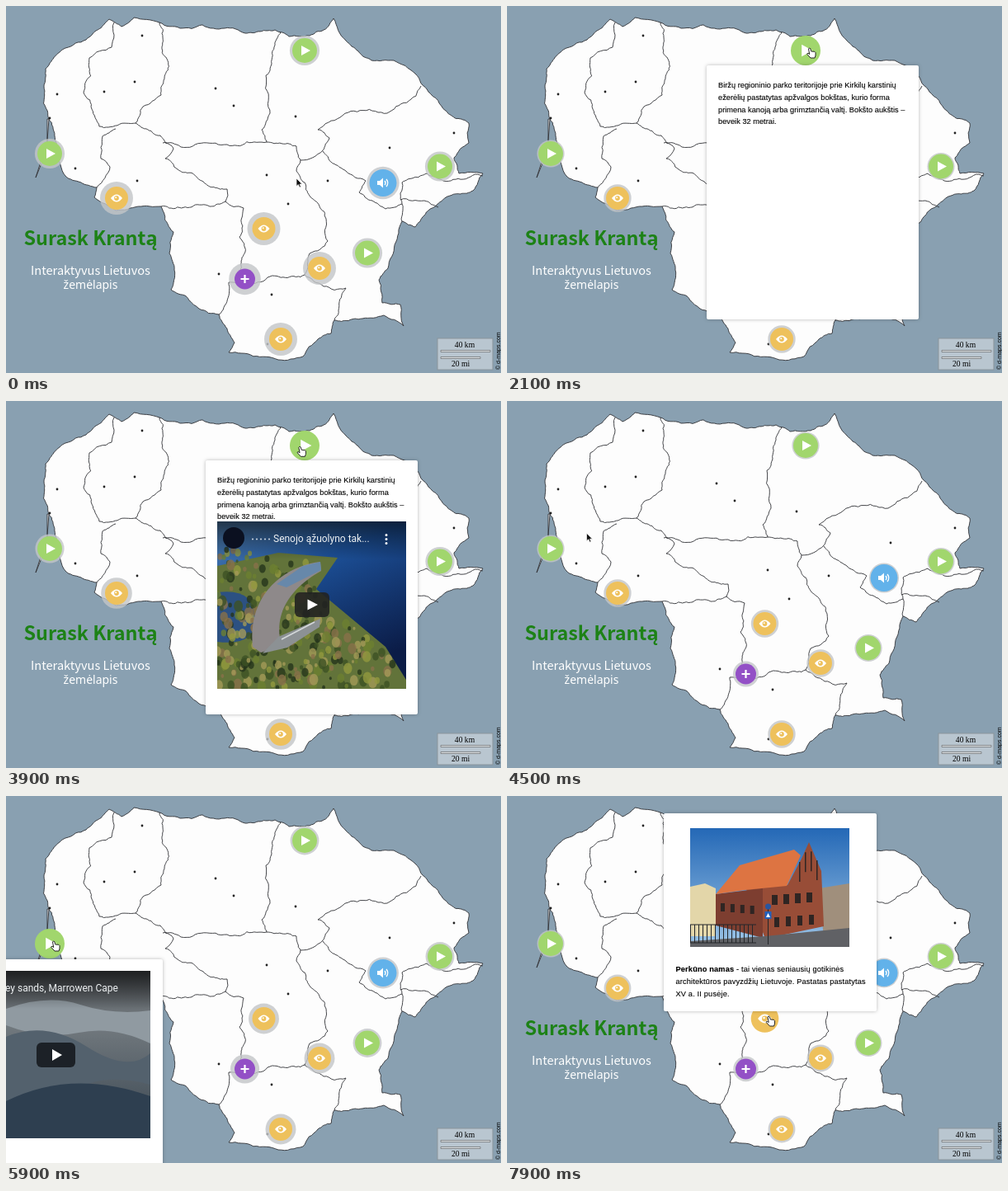
Animation of 600x445 px, one loop 8000 ms. Source, as an HTML page:

```html
<!DOCTYPE html>
<html lang="lt">
<head>
<meta charset="utf-8">
<title>Interaktyvus žemėlapis</title>
<style>
html, body { margin: 0; width: 100%; height: 100%; overflow: hidden; background: #89a0b1; }
svg { display: block; width: 600px; height: 445px; }
.line { fill: none; stroke: #303236; stroke-width: .9; stroke-linejoin: round; }
.land { fill: #fdfdfd; }
.head { font-family: "Noto Sans CJK SC", "Noto Sans CJK JP", "Noto Sans", sans-serif; text-anchor: middle; }
.body { font: 9.2px "Liberation Sans", Arial, sans-serif; fill: #000; stroke: #000; stroke-width: .12px; letter-spacing: .04px; }
.video { font: 12px Roboto, sans-serif; fill: #eef1f3; }
.scale { font: 9.6px "Liberation Serif", Times, serif; text-anchor: middle; }
.popup { filter: drop-shadow(0 0 2px rgba(0,0,0,.28)); }
</style>
</head>
<body>
<svg viewBox="0 0 600 445">
  <defs>
    <linearGradient id="lake" x1="0" y1="0" x2=".5" y2="1">
      <stop offset="0" stop-color="#5586b8"/><stop offset=".4" stop-color="#1c4f96"/><stop offset="1" stop-color="#0b1c47"/>
    </linearGradient>
    <linearGradient id="sky" x1="0" y1="0" x2="0" y2="1">
      <stop offset="0" stop-color="#2468b6"/><stop offset="1" stop-color="#9cc4e6"/>
    </linearGradient>
    <linearGradient id="dune" x1="0" y1="0" x2="0" y2="1">
      <stop offset="0" stop-color="#4b4f53"/><stop offset=".3" stop-color="#747b80"/><stop offset="1" stop-color="#37444f"/>
    </linearGradient>
    <linearGradient id="shade" x1="0" y1="0" x2="0" y2="1">
      <stop offset="0" stop-color="#000" stop-opacity=".6"/><stop offset="1" stop-color="#000" stop-opacity="0"/>
    </linearGradient>
    <clipPath id="clipLake"><rect x="256" y="146" width="229" height="203"/></clipPath>
    <clipPath id="clipHouse"><rect x="222" y="39" width="193" height="144"/></clipPath>
    <clipPath id="clipDune"><rect x="0" y="212" width="175" height="203"/></clipPath>
  </defs>
  <rect width="600" height="445" fill="#89a0b1"/>
  <g id="map"></g>

  <g id="legend">
    <rect x="523" y="403" width="67" height="38" fill="#b9c6d0" stroke="#8b959c"/>
    <text class="scale" x="556" y="414">40 km</text>
    <text class="scale" x="551" y="437">20 mi</text>
    <path d="M527 417.5h60v2h-60zM527 425.5h48v2h-48z" fill="#dfe4e7" stroke="#555" stroke-width=".6"/>
    <text transform="translate(598.5 441) rotate(-90)" font-family="Liberation Sans, Arial, sans-serif" font-size="7">© d-maps.com</text>
  </g>

  <g class="head">
    <text x="102.5" y="290" font-size="23.4" font-weight="700" fill="#1d8216">Surask Krantą</text>
    <g fill="#fff">
      <text x="102.5" y="326" font-size="14.6">Interaktyvus Lietuvos</text>
      <text x="102.5" y="343" font-size="14" font-family="Noto Sans, sans-serif">žemėlapis</text>
    </g>
  </g>
  <g id="markers"></g>

  <g id="tower" class="popup">
    <rect x="242" y="72" width="257" height="308" rx="2" fill="#fff"/>
    <g class="body">
      <text x="256" y="98.5">Biržų regioninio parko teritorijoje prie Kirkilų karstinių</text>
      <text x="256" y="113.5">ežerėlių pastatytas apžvalgos bokštas, kurio forma</text>
      <text x="256" y="128.5">primena kanoją arba grimztančią valtį. Bokšto aukštis –</text>
      <text x="256" y="143">beveik 32 metrai.</text>
    </g>
    <g id="towerVideo" clip-path="url(#clipLake)">
      <rect x="256" y="146" width="229" height="203" fill="url(#lake)"/>
      <path d="M256 200L330 184 402 190 376 228 460 298 485 338V349H256z" fill="#62733a"/>
      <path d="M256 232Q300 226 302 262T256 292z" fill="#2c5182"/>
      <g id="trees"></g>
      <path d="M381 195C342 199 292 231 299 298L309 305 334 297C322 254 350 224 382 206z" fill="#8e898a"/>
      <path d="M328 222L360 200 381 195 382 205 340 226z" fill="#6788aa"/>
      <path d="M330 286L381 264 380 274 341 299 311 306z" fill="#8c9194"/>
      <path d="M334 289L374 268" stroke="#d4d8da" stroke-width="1.5"/>
      <rect x="256" y="146" width="229" height="46" fill="url(#shade)"/>
      <circle cx="276" cy="166" r="13" fill="#0b1020"/>
      <path d="M299 167.5H321" stroke="#d5dde5" stroke-width="2" stroke-linecap="round" stroke-dasharray="0 5"/>
      <text class="video" x="324" y="171">Senojo ąžuolyno tak...</text>
      <path d="M461 162.5v11" stroke="#fff" stroke-width="3" stroke-linecap="round" stroke-dasharray="0 5"/>
      <rect x="350" y="232" width="42" height="30" rx="6" fill="#222" fill-opacity=".88"/>
      <path d="M365.5 240.5L378 247 365.5 253.5z" fill="#fff"/>
    </g>
  </g>

  <g id="dunes" class="popup">
    <rect x="-68" y="198" width="258" height="308" rx="2" fill="#fff"/>
    <g id="dunesVideo" clip-path="url(#clipDune)">
      <rect y="212" width="175" height="203" fill="url(#dune)"/>
      <path d="M0 258Q50 240 90 253T175 260V300Q130 278 88 287T0 278z" fill="#909aa1"/>
      <path d="M0 292Q48 272 98 304T175 312V350Q110 332 72 365T0 378z" fill="#53616d"/>
      <path d="M0 370Q80 330 175 364V415H0z" fill="#2e3f50"/>
      <rect y="212" width="175" height="46" fill="url(#shade)"/>
      <text class="video" x="-1" y="237">ey sands, Marrowen Cape</text>
      <rect x="37" y="299" width="47" height="30" rx="6" fill="#171b20" fill-opacity=".9"/>
      <path d="M56 307L68 314 56 321z" fill="#fff"/>
    </g>
  </g>

  <g id="house" class="popup">
    <rect x="190" y="21" width="258" height="240" rx="2" fill="#fff"/>
    <g clip-path="url(#clipHouse)">
      <rect x="222" y="39" width="193" height="144" fill="url(#sky)"/>
      <path d="M222 110L240 106 253 112V170H222z" fill="#e3d6a9"/>
      <path d="M378 112L415 106V172H384z" fill="#a08f7c"/>
      <path d="M290 113L340 108 357 76 366 56 381 91 384 158 313 173z" fill="#984d37"/>
      <path d="M310 112V172L253 157V119z" fill="#7d3e30"/>
      <path d="M253 119L282 84 348 65 356 72 339 109 288 114z" fill="#dd7442"/>
      <g id="windows" fill="#2f2523"></g>
      <path d="M222 176L313 170 415 160V183H222z" fill="#606165"/>
      <path d="M222 167H302" stroke="#24272a" stroke-width="22" stroke-dasharray="1 4"/>
      <path d="M222 156H302M222 178H302M316.5 135V180" stroke="#24272a"/>
      <circle cx="316.5" cy="134" r="3.5" fill="#2856a0"/>
      <rect x="312.5" y="140" width="8" height="9" fill="#2461bb"/>
      <path d="M316.5 142L319 147H314z" fill="#fff"/>
    </g>
    <g class="body" style="letter-spacing:.18px">
      <text x="204.5" y="213"><tspan font-weight="700">Perkūno namas</tspan> - tai vienas seniausių gotikinės</text>
      <text x="204.5" y="228">architektūros pavyzdžių Lietuvoje. Pastatas pastatytas</text>
      <text x="204.5" y="243">XV a. II pusėje.</text>
    </g>
  </g>

  <g id="cursor">
    <path id="arrow" d="M0 0V9.5L2.3 7.5 3.9 11 5.5 10.3 4 7H7z" fill="#111" stroke="#fff" stroke-width=".7"/>
    <path id="hand" d="M-1 1Q0-1 1.3.7L2.3 4 6.3 4.3 7.5 5.5V9L6.5 12H1.5L-2.7 7.5Q-3 6-1.2 6.5L.2 7.5z" fill="#fff" stroke="#111" stroke-width=".9"/>
  </g>
</svg>
<script>
const LOOP = 8000, STEP = 100, PULSE = 3300;
const $ = id => document.getElementById(id);

let seed = 7;
const rand = () => (seed = (seed * 16807) % 2147483647) / 2147483647;
const pick = list => list[Math.floor(rand() * list.length)];
const points = text => text.trim().split(/\s+/).map(p => p.split(",").map(Number));

function add(parent, tag, attrs) {
  const el = document.createElementNS("http://www.w3.org/2000/svg", tag);
  for (const key in attrs) el.setAttribute(key, attrs[key]);
  return parent.appendChild(el);
}

// Midpoint displacement between two key points
function split([ax, ay], [bx, by], wild) {
  const dx = bx - ax, dy = by - ay;
  if (Math.hypot(dx, dy) < 4) return [[bx, by]];
  const k = (rand() - .5) * 2 * wild;
  const mid = [(ax + bx) / 2 - dy * k, (ay + by) / 2 + dx * k];
  return [...split([ax, ay], mid, wild), ...split(mid, [bx, by], wild)];
}

function rough(text, wild) {
  const pts = points(text);
  const all = pts.slice(1).flatMap((p, i) => split(pts[i], p, wild));
  return "M" + [pts[0], ...all].map(p => p.map(v => v.toFixed(1))).join("L");
}

const coast = `52,137 46,98 48,76 72,51 97,41 125,16 140,25 155,14 186,20 211,27 265,27 290,33 326,29 343,37 368,36
  385,29 397,15 412,42 443,66 470,66 496,82 512,104 533,127 561,142 561,166 543,184 549,203 578,203 566,224
  535,231 507,254 496,268 480,261 463,318 452,332 456,360 478,362 482,388 458,375 432,379 398,381 394,397
  378,404 360,425 330,429 270,420 277,408 258,374 234,367 200,344 204,320 198,300 203,274 188,243 133,248
  107,232 110,220 72,206 62,178 52,137`;
const borders = [
  "131,20 128,50 101,63 94,105 113,146 157,142",
  "133,149 117,158 115,185 126,195 110,220",
  "186,20 190,38 188,108 166,122 157,142 187,157 203,173",
  "190,166 212,171 268,168 316,165",
  "333,31 322,70 320,130 310,150 316,165 352,170 357,187",
  "203,173 193,185 208,198 268,222 266,237 188,243",
  "266,237 288,245 283,280 290,298 285,329",
  "357,187 352,200 388,258 390,285 368,300 362,326",
  "258,374 270,335 320,328 362,326 385,340 412,342 398,381",
  "357,187 384,175 392,160 378,150 405,135 462,130 503,97",
  "384,176 412,200 436,212 428,226 460,246 480,240 480,261",
  "480,240 480,214 510,203 530,212 578,206",
  "478,235 507,236 524,244"
];
const towns = `165,36 156,92 119,104 62,107 254,100 276,121 351,134 53,136 84,197 159,212 316,205 342,240
  390,212 465,172 543,154 258,325 322,350 317,410`;

const map = $("map");
add(map, "path", { d: rough(coast, .09) + "z", class: "line land" });
add(map, "path", { d: "M50 137V164L36 208 49 176 52 137z", class: "line land" });
borders.forEach(b => add(map, "path", { d: rough(b, .13), class: "line" }));
points(towns).forEach(([cx, cy]) => add(map, "circle", { cx, cy, r: 1.4, fill: "#222" }));

for (let i = 0; i < 420; i++) {
  const cx = 256 + rand() * 215, cy = 178 + rand() * 170;
  const onWater = cy < 235 + (cx - 376) * .85 && cx > 376 || cx > 300 && cy < 190;
  if (onWater) continue;
  const size = 1.5 + rand() * 4;
  add($("trees"), "ellipse", { cx, cy, rx: size, ry: size * 1.3, opacity: .8,
    fill: pick(["#26351c", "#3d5124", "#6d7f31", "#92983f", "#88704a", "#a49a58"]) });
}
for (let i = 0; i < 4; i++) {
  const x = i * 14;
  add($("windows"), "rect", { x: 259 + x * .85, y: 130 + i, width: 5, height: 10 });
  add($("windows"), "rect", { x: 321 + x, y: 120 - i, width: 7, height: 12 });
  add($("windows"), "rect", { x: 324 + x, y: 147 - i, width: 6, height: 12 });
  add($("windows"), "rect", { x: 354 + x * .5, y: 80 - Math.sin(i) * 14, width: 1.5, height: 24 });
}

const kinds = {
  play: { color: "#a1d66d", r: 15, halo: 17.2, swing: .9, icon: '<path d="M-4-6L7 0-4 6z" fill="#fff"/>' },
  eye: { color: "#eec15c", r: 14, halo: 18, swing: 2,
    icon: '<path d="M-7 0Q0-9 7 0Q0 9-7 0z" fill="#fff"/><circle r="2.9" fill="#eec15c"/><circle cx="-.8" cy="-.8" r="1" fill="#fff"/>' },
  sound: { color: "#62b2ea", r: 16.5, halo: 18.7, swing: 1,
    icon: '<path d="M-7-2.5H-4L0-6V6L-4 2.5H-7z" fill="#fff"/><path d="M2-2.5Q4 0 2 2.5M4-4.5Q7.5 0 4 4.5" fill="none" stroke="#fff" stroke-width="1.4"/>' },
  plus: { color: "#9350c6", r: 12.5, halo: 17, swing: 2.3, icon: '<path d="M-5 0H5M0-5V5" stroke="#fff" stroke-width="2.2"/>' }
};
const places = {
  play: "362,54 53,179 526,194.5 438,299.5",
  eye: "134,233 312.5,270 380,318 333,404",
  sound: "457,214.5",
  plus: "289.5,331"
};

function makeMarker(kind, [x, y]) {
  const g = add($("markers"), "g", { transform: `translate(${x} ${y})` });
  const halo = add(g, "circle", { fill: "#c3c6c8", "fill-opacity": .8 });
  const face = add(g, "g", {});
  add(face, "circle", { r: kind.r, fill: kind.color });
  add(face, "g", {}).innerHTML = kind.icon;
  return { kind, x, y, halo, face };
}
const markers = Object.keys(places).flatMap(name => points(places[name]).map(p => makeMarker(kinds[name], p)));

// Each visit: pointer rests on a marker, its popup follows
const visits = [
  { popup: "tower", marker: markers[0], arrive: 1200, leave: 3800, video: 2600 },
  { popup: "dunes", marker: markers[1], arrive: 4700, leave: 6200, video: 5700 },
  { popup: "house", marker: markers[5], arrive: 6950, leave: LOOP }
];

const clamp = v => Math.min(1, Math.max(0, v));
const ease = v => v * v * (3 - 2 * v);
const ramp = (t, from, span) => ease(clamp((t - from) / span));

function pointer(t) {
  let x = 352, y = 209, left = 400;
  for (const { marker, arrive, leave } of visits) {
    const k = ramp(t, left, arrive - left);
    x += (marker.x + 4.5 - x) * k;
    y += (marker.y - 3 - y) * k;
    left = leave;
  }
  return [x, y];
}

const show = (id, on) => { $(id).style.display = on ? "" : "none"; };

function render(t) {
  const [px, py] = pointer(t);
  const wave = Math.cos(2 * Math.PI * t / PULSE);
  let over = false;
  for (const m of markers) {
    const hot = Math.hypot(px - m.x, py - m.y) < 17;
    over = over || hot;
    m.face.setAttribute("transform", `scale(${hot ? 1.2 : 1})`);
    m.halo.setAttribute("r", hot ? 0 : m.kind.halo + m.kind.swing * wave);
  }
  for (const { popup, arrive, leave, video } of visits) {
    const shown = ramp(t, arrive + 120, 380) * (1 - ramp(t, leave + 230, 450));
    $(popup).style.opacity = shown;
    show(popup, shown > 0);
    if (video) show(popup + "Video", t >= video);
  }
  $("cursor").setAttribute("transform", `translate(${px} ${py})`);
  show("arrow", !over);
  show("hand", over);
}

const start = performance.now();
function tick() {
  const t = (performance.now() - start) % LOOP;
  render(Math.floor(t / STEP) * STEP);
  requestAnimationFrame(tick);
}
tick();
</script>
</body>
</html>
```
